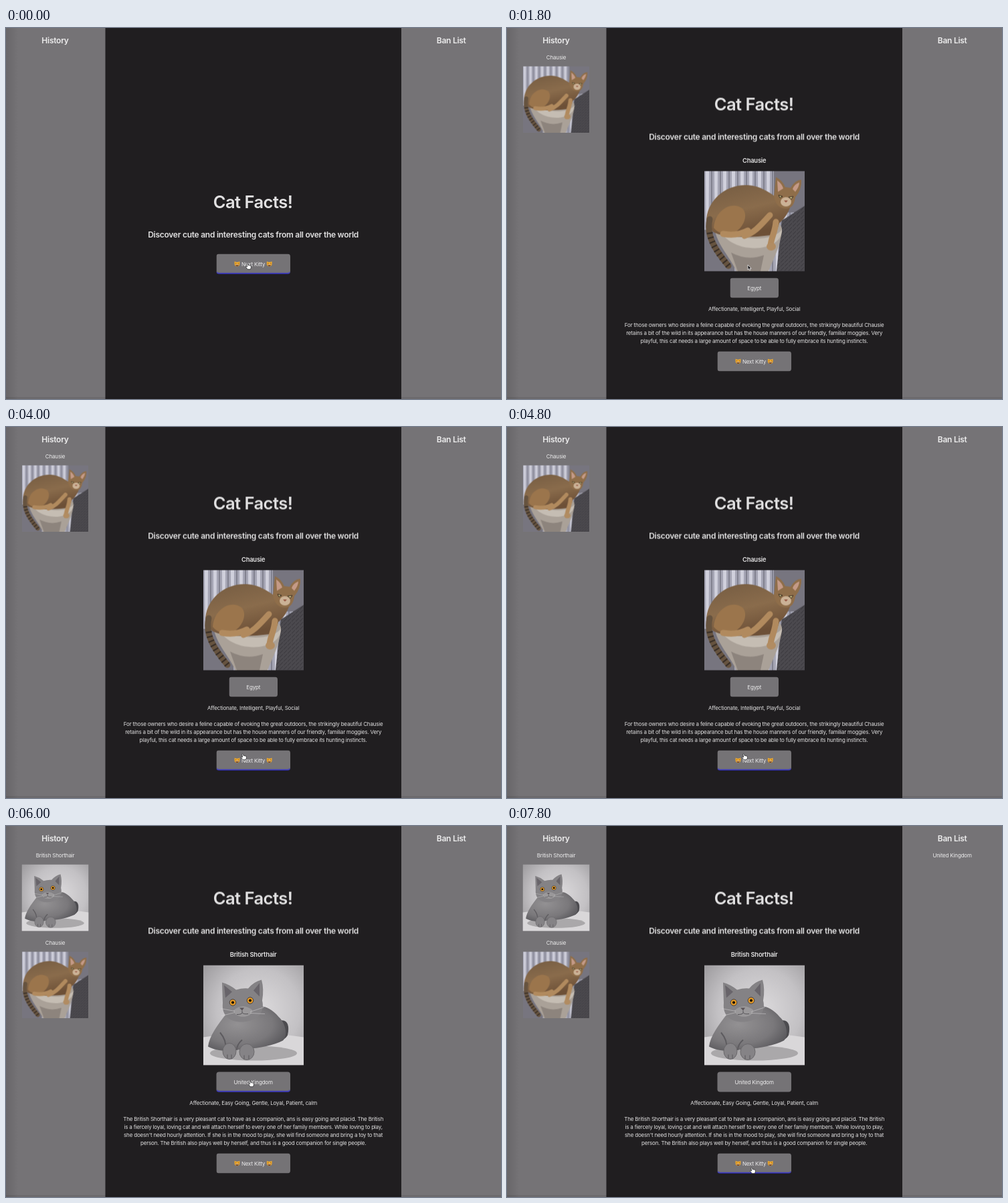
Write an HTML page that moves like this. It is 740x556 px and loops after 8000 ms.

```html
<!DOCTYPE html>
<html lang="en">
<head>
<meta charset="utf-8">
<title>Cat Facts</title>
<style>
  html, body { margin: 0; width: 100%; height: 100%; overflow: hidden; background: #201e20; }
  svg.stage { display: block; width: 100vw; height: 100vh; }
  text {
    font: 400 8px Inter, "Open Sans", sans-serif;
    letter-spacing: -.022em;
    text-anchor: middle;
    fill: #fff; fill-opacity: .87;
  }
  .h1 { font-size: 25.6px; font-weight: 600; }
  .h2 { font-size: 12px; font-weight: 600; }
  .h3 { font-size: 9.36px; font-weight: 600; }
  .button { fill: #757376; }
  .line { fill: none; stroke: #2523e6; stroke-width: 1.3; }

  /* Hard cuts on one shared 8 s clock */
  .cut { animation: 8s step-end infinite; }
  .title { animation-name: title; }
  .next { animation-name: next; }
  .first { animation-name: first; }
  .second { animation-name: second; }
  .history { animation-name: history; }
  .older { animation-name: older; }
  .loaded { animation-name: loaded; }
  .banned { animation-name: banned; }
  .next-line { animation-name: next-line; }
  .first-line { animation-name: first-line; }
  .second-line { animation-name: second-line; }
  .hand { animation-name: hand; }
  .arrow { animation-name: arrow; }
  .beam { animation-name: beam; }
  .cursor { animation: move 8s step-end infinite; }

  @keyframes title {
    0% { transform: none; }
    17.5% { transform: translateY(-146.5px); }
    62.5%, 100% { transform: translateY(-152.5px); }
  }
  @keyframes next {
    0% { transform: none; }
    17.5% { transform: translateY(146px); }
    62.5%, 100% { transform: translateY(152px); }
  }
  @keyframes first { 0%, 62.5%, 100% { opacity: 0; } 17.5% { opacity: 1; } }
  @keyframes second { 0% { opacity: 0; } 62.5%, 100% { opacity: 1; } }
  @keyframes history { 0% { opacity: 0; } 17.5%, 100% { opacity: 1; } }
  @keyframes older { 0% { transform: none; } 62.5%, 100% { transform: translateY(131px); } }
  @keyframes loaded { 0% { opacity: 0; } 20%, 100% { opacity: 1; } }
  @keyframes banned { 0% { opacity: 0; } 80%, 100% { opacity: 1; } }
  @keyframes next-line { 0%, 47.5%, 90%, 100% { opacity: 1; } 17.5%, 67.5% { opacity: 0; } }
  @keyframes first-line { 0%, 42.5%, 100% { opacity: 0; } 32.5% { opacity: 1; } }
  @keyframes second-line { 0%, 87.5%, 100% { opacity: 0; } 70% { opacity: 1; } 85% { opacity: .8; } }
  @keyframes hand {
    0%, 32.5%, 45%, 70%, 90%, 100% { opacity: 1; }
    17.5%, 42.5%, 65%, 82.5% { opacity: 0; }
  }
  @keyframes arrow { 0%, 32.5%, 100% { opacity: 0; } 17.5% { opacity: 1; } }
  @keyframes beam {
    0%, 45%, 70%, 90%, 100% { opacity: 0; }
    42.5%, 65%, 82.5% { opacity: 1; }
  }
  @keyframes move {
    0% { transform: translate(362px, 357px); }
    17.5% { transform: translate(362px, 359px); }
    32.5% { transform: translate(365px, 390px); }
    35%, 40% { transform: translate(365px, 392px); }
    40% { animation-timing-function: steps(2); }
    45%, 50% { transform: translate(355px, 494px); }
    50% { animation-timing-function: steps(5); }
    62.5% { transform: translate(355px, 500px); animation-timing-function: steps(3); }
    70%, 80% { transform: translate(366px, 386px); }
    80% { animation-timing-function: steps(2); }
    85% { transform: translate(359.5px, 435px); animation-timing-function: steps(2); }
    90%, 100% { transform: translate(367px, 516px); }
  }
</style>
</head>
<body>
<svg class="stage" viewBox="0 0 740 556" preserveAspectRatio="none">
  <defs>
    <linearGradient id="edge">
      <stop stop-color="#686669"/><stop offset="1" stop-color="#757376"/>
    </linearGradient>
    <radialGradient id="studio" cx=".55" cy=".45" r=".75">
      <stop stop-color="#dddbdd"/><stop offset=".55" stop-color="#c3c1c4"/><stop offset="1" stop-color="#969497"/>
    </radialGradient>
    <linearGradient id="tabby" x2=".4" y2="1">
      <stop stop-color="#755c42"/><stop offset=".55" stop-color="#8a6c4c"/><stop offset="1" stop-color="#6d5037"/>
    </linearGradient>
    <radialGradient id="grey" cx=".38" cy=".4" r=".75">
      <stop stop-color="#939193"/><stop offset=".6" stop-color="#7a787b"/><stop offset="1" stop-color="#515054"/>
    </radialGradient>
    <pattern id="folds" width="13" height="150" patternUnits="userSpaceOnUse">
      <path fill="#a5a5b4" d="M0 0h13v150H0z"/>
      <path fill="#d0d0dc" d="M2 0h5l-1 150H3z"/>
      <path fill="#81818f" d="M10 0h2v150h-2z"/>
    </pattern>
    <pattern id="rug" width="6" height="6" patternUnits="userSpaceOnUse">
      <path fill="#4b494e" d="M0 0h6v6H0z"/><path stroke="#38363b" d="M0 5l5-5"/>
    </pattern>

    <symbol id="brown-cat" viewBox="0 0 150 150">
      <path fill="url(#folds)" d="M0 0h150v150H0z"/>
      <path fill="#77757f" d="M104 0h46v62h-46zM0 88h45v62H0z"/>
      <path fill="url(#rug)" d="M150 52l-34 22-8 76h42z"/>
      <path fill="#aaa198" d="M14 78C14 55 122 62 116 90c-3 25-14 44-20 60H48C37 126 16 108 14 78z"/>
      <path fill="#c5bdb3" d="M18 78C35 102 98 110 116 88c0 14-12 24-32 27-29 3-57-9-66-37z"/>
      <path fill="#8d847d" d="M40 122q24 13 49 4l-5 24H50z"/>
      <path fill="url(#tabby)" d="M3 76C3 44 32 19 65 21c19 1 32 11 44 19l21 9c-4 13-9 21-18 29-2 9-6 14-13 18-30 4-72 4-86-5z"/>
      <path fill="none" stroke="#66533f" stroke-width="9" stroke-linecap="round" d="M8 72C2 98 18 120 36 142"/>
      <path fill="none" stroke="#342b25" stroke-width="9" stroke-dasharray="2 5" d="M8 92c3 20 15 34 28 50"/>
      <path fill="#9b754c" d="M14 85c2-27 27-41 43-29 9 9 2 27-9 34-11 5-24 7-34-5z"/>
      <path fill="none" stroke="#b18a5e" stroke-width="9" stroke-linecap="round" d="M28 94q20 4 37-5M98 66C85 80 76 92 60 97M107 76c-1 16-8 25-8 37"/>
      <ellipse cx="100" cy="113" rx="7" ry="6" fill="#b18c62"/>
      <path fill="#8f6e4a" d="M104 38l3-29q10 5 14 15l8 1q7-12 16-12 1 15-9 26-2 18-16 17-13-2-16-18z"/>
      <path fill="#c49a87" d="M109 14q7 5 9 12l-8 5zm33 3q-8 3-10 10l4 4q6-8 6-14z"/>
      <ellipse cx="122" cy="46" rx="8" ry="7" fill="#cbb296"/>
      <path fill="#d9d292" stroke="#392b20" d="M111 36l6 2-4 2zm15 3l7-1-3 4z"/>
      <path fill="#94533f" d="M119 44h6l-3 3z"/>
    </symbol>

    <symbol id="grey-cat" viewBox="0 0 150 150">
      <path fill="url(#studio)" d="M0 0h150v150H0z"/>
      <path fill="#d9d7d9" d="M0 108q75-12 150 0v42H0z"/>
      <ellipse cx="75" cy="132" rx="65" ry="11" fill="#aaa8aa"/>
      <path fill="#4c4b4f" d="M108 86c16-9 22 2 18 19q-6 12-33 11z"/>
      <path fill="url(#grey)" d="M35 72C20 91 9 107 7 122c13 7 32 9 53 3 20 1 45-5 59-12 8-8 4-26-6-35C102 65 92 61 82 62z"/>
      <path fill="#848285" d="M29 57l-1-31q11 3 21 11 10-3 18-2 8-10 20-13 4 14 1 31c5 21-11 31-29 32-19 1-32-9-30-28z"/>
      <path fill="#68646a" d="M31 30l12 10-10 9zm53-3l-9 11 9 9z"/>
      <path fill="#9a989a" d="M45 68q13-12 28-1c2 12-25 15-28 1z"/>
      <g fill="#e69a25" stroke="#424044"><circle cx="44" cy="56" r="4.8"/><circle cx="70" cy="53" r="4.8"/></g>
      <circle cx="44" cy="56" r="2"/><circle cx="70" cy="53" r="2"/>
      <path fill="#5a5357" d="M54 64h7l-3 4z"/>
      <path fill="none" stroke="#555357" d="M58 68v3m-8 3q8 0 8-3 2 3 9 2"/>
      <path stroke="#d8d6d8" stroke-width=".5" d="M47 69l-21-4m21 6l-20 5m43-6l21-7m-21 9l22 1"/>
      <path fill="none" stroke="#5d5b5f" stroke-width="2" d="M25 101q10 12 8 24m25-13q-8 7-8 15"/>
      <g fill="#858386" stroke="#6a686b"><ellipse cx="39" cy="129" rx="10" ry="12"/><ellipse cx="65" cy="130" rx="11" ry="12"/></g>
      <path stroke="#59575b" d="M36 134v6m6-6v6m19-5v6m7-6v6"/>
    </symbol>

    <symbol id="smiley" viewBox="0 0 9 9">
      <path fill="#f2ac2d" d="M.6 4.6L.7.7l2 1.1h3.6l2-1.1.1 3.9C8.4 9.6.6 9.6.6 4.6z"/>
      <path fill="none" stroke="#5b351a" stroke-width=".75" d="M1.8 4.1q.8-1.1 1.6 0m2.2 0q.8-1.1 1.6 0"/>
      <path fill="#643114" d="M2 5.4h5q-.5 2.5-2.5 2.5T2 5.4z"/>
      <path fill="#fff3df" d="M2.4 5.5h4.2l-.3.8H2.7z"/>
    </symbol>
  </defs>

  <path fill="#201e20" d="M0 0h740v556H0z"/>
  <path fill="#757376" d="M0 0h148.5v556H0zM591 0h149v556H591z"/>
  <path fill="url(#edge)" d="M0 0h18v556H0z"/>
  <path fill="#000" opacity=".08" d="M0 553h740v3H0z"/>
  <text class="h2" x="73.5" y="23.3">History</text>
  <text class="h2" x="665.7" y="23.3">Ban List</text>

  <g class="cut title">
    <text class="h1" x="369" y="269.5">Cat Facts!</text>
    <text class="h2" x="369.6" y="314.3">Discover cute and interesting cats from all over the world</text>
  </g>

  <g class="cut history">
    <g class="cut older">
      <text x="73.5" y="46.5">Chausie</text>
      <use class="cut loaded" href="#brown-cat" x="23.5" y="57.5" width="100" height="100"/>
    </g>
  </g>

  <g class="cut first">
    <text class="h3" x="369.7" y="202.3">Chausie</text>
    <use class="cut loaded" href="#brown-cat" x="295" y="214.5" width="150" height="150"/>
    <g transform="translate(333.5 374.5)">
      <rect class="button" width="72.5" height="30" rx="4"/>
      <path class="line cut first-line" d="M.8 27.5Q1.6 29.4 4 29.4H68.5Q70.9 29.4 71.7 27.5"/>
      <text x="36.2" y="18.1">Egypt</text>
    </g>
    <text x="369.7" y="423.5">Affectionate, Intelligent, Playful, Social</text>
    <text x="369.7" y="447.5">For those owners who desire a feline capable of evoking the great outdoors, the strikingly beautiful Chausie</text>
    <text x="369.7" y="459.5">retains a bit of the wild in its appearance but has the house manners of our friendly, familiar moggies. Very</text>
    <text x="369.7" y="471.5">playful, this cat needs a large amount of space to be able to fully embrace its hunting instincts.</text>
  </g>

  <g class="cut second">
    <text x="73.5" y="46.5">British Shorthair</text>
    <use href="#grey-cat" x="23.5" y="57.5" width="100" height="100"/>
    <text class="h3" x="369.7" y="196.3">British Shorthair</text>
    <use href="#grey-cat" x="295" y="208.5" width="150" height="150"/>
    <g transform="translate(314.5 368.5)">
      <rect class="button" width="110.5" height="30" rx="4"/>
      <path class="line cut second-line" d="M.8 27.5Q1.6 29.4 4 29.4H106.5Q108.9 29.4 109.7 27.5"/>
      <text x="55.2" y="18.1">United Kingdom</text>
    </g>
    <text x="369.7" y="417.5">Affectionate, Easy Going, Gentle, Loyal, Patient, calm</text>
    <text x="369.7" y="441.5">The British Shorthair is a very pleasant cat to have as a companion, ans is easy going and placid. The British</text>
    <text x="369.7" y="453.5">is a fiercely loyal, loving cat and will attach herself to every one of her family members. While loving to play,</text>
    <text x="369.7" y="465.5">she doesn't need hourly attention. If she is in the mood to play, she will find someone and bring a toy to that</text>
    <text x="369.7" y="477.5">person. The British also plays well by herself, and thus is a good companion for single people.</text>
  </g>

  <text class="cut banned" x="665.7" y="46.5">United Kingdom</text>

  <g class="cut next">
    <g transform="translate(314.5 338.5)">
      <rect class="button" width="110.5" height="30" rx="4"/>
      <path class="line cut next-line" d="M.8 27.5Q1.6 29.4 4 29.4H106.5Q108.9 29.4 109.7 27.5"/>
      <use href="#smiley" x="26.5" y="10.5" width="9" height="9"/>
      <text x="55.2" y="18.1">Next Kitty</text>
      <use href="#smiley" x="74.7" y="10.5" width="9" height="9"/>
    </g>
  </g>

  <g class="cursor">
    <path class="cut hand" fill="#fff" stroke="#18171a" stroke-width=".7" stroke-linejoin="round"
      d="M-2.2-4q1-1 1.6.3l.8 2.4q1-.6 1.5.2 1-.5 1.5.4 1.1-.1 1.2 1l-.1 2.2-1 2.2H-.8l-2.6-3.4q-.3-1.2 1.1-.9l.9.6z"/>
    <path class="cut arrow" fill="#18171a" stroke="#fff" stroke-width=".7"
      d="M-2-4v7.2l1.6-1.5L.8 4.3l1.3-.6L1 1.3h2.2z"/>
    <path class="cut beam" fill="none" stroke="#e4e3e4" stroke-width=".9"
      d="M-2-4.2q2 0 2 1.4 0-1.4 2-1.4M0-3v6M-2 4.2q2 0 2-1.4 0 1.4 2 1.4M-1.2.9h2.4"/>
  </g>
</svg>
</body>
</html>
```
